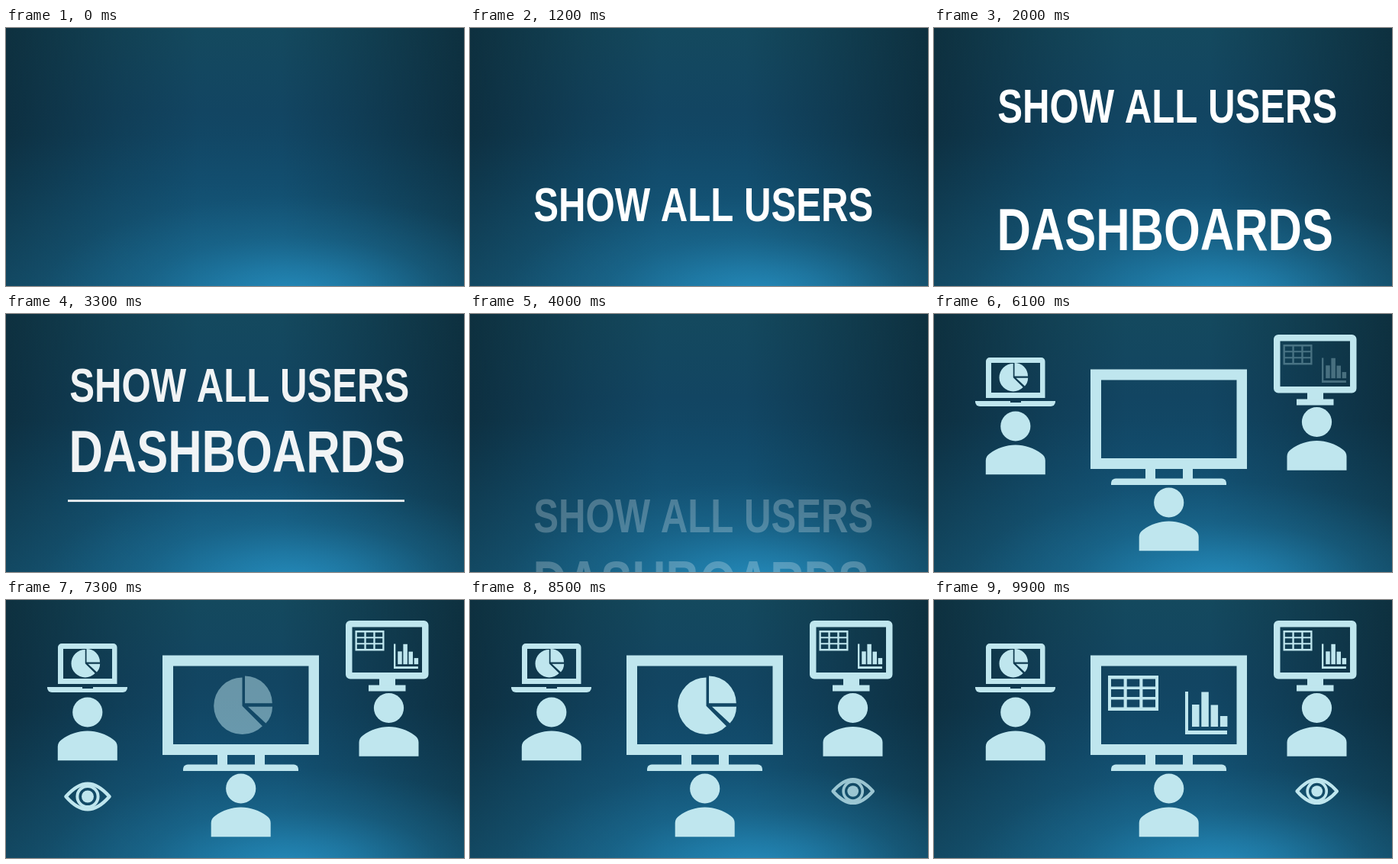
Recreate the animation shown at these times as an HTML page with a canvas. Size 600 by 338 pixels, loop 10 s.

```html
<!DOCTYPE html>
<html lang="en">
<head>
<meta charset="utf-8">
<title>Show all users dashboards</title>
<style>
html, body { margin: 0; width: 100%; height: 100%; overflow: hidden; background: #124a68; }
canvas { display: block; width: 100vw; height: 100vh; }
</style>
</head>
<body>
<canvas id="stage" width="600" height="338"></canvas>
<script>
const W = 600, H = 338, LOOP = 10000, STEP = 100;
const ICON = '#bfe6ee', NARROW = 0.788, RAD = Math.PI / 180;

const out = document.getElementById('stage').getContext('2d');
const makeLayer = () => {
  const c = document.createElement('canvas');
  c.width = W;
  c.height = H;
  return c.getContext('2d');
};
const back = makeLayer();
const g = makeLayer();

const clamp = v => Math.max(0, Math.min(1, v));
const ramp = (t, start, dur) => clamp((t - start) / dur);

// ---------- background ----------
function shade(gradient, stops) {
  for (const [at, color] of stops) gradient.addColorStop(at, color);
  back.fillStyle = gradient;
}

function paintBack() {
  shade(back.createLinearGradient(0, 0, 0, H),
    [[0, '#14495e'], [0.32, '#124562'], [0.6, '#114a6a'], [1, '#15597b']]);
  back.fillRect(0, 0, W, H);
  const dark = a => `rgba(11,38,50,${a})`;
  shade(back.createLinearGradient(0, 0, W, 0),
    [[0, dark(0.7)], [0.12, dark(0.48)], [0.25, dark(0.24)], [0.42, dark(0)],
     [0.6, dark(0)], [0.75, dark(0.24)], [0.88, dark(0.48)], [1, dark(0.7)]]);
  back.fillRect(0, 0, W, H);
  shade(back.createLinearGradient(0, 140, 0, H),
    [[0, 'rgba(28,113,154,0)'], [1, 'rgba(28,113,154,.32)']]);
  back.fillRect(0, 140, W, H - 140);
  back.save();
  back.translate(375, 352);
  back.scale(1, 0.4);
  shade(back.createRadialGradient(0, 0, 0, 0, 0, 330),
    [[0, 'rgba(38,144,194,.9)'], [0.3, 'rgba(36,138,186,.58)'],
     [0.6, 'rgba(32,126,170,.24)'], [1, 'rgba(28,113,154,0)']]);
  back.fillRect(-400, -400, 800, 800);
  back.restore();
}

// ---------- helpers ----------
function layer(alpha, dy, draw) {
  if (alpha <= 0) return;
  g.clearRect(0, 0, W, H);
  g.save();
  g.translate(0, dy);
  g.fillStyle = g.strokeStyle = ICON;
  draw();
  g.restore();
  out.globalAlpha = alpha;
  out.drawImage(g.canvas, 0, 0);
  out.globalAlpha = 1;
}

function at(x, y, s, draw) {
  g.save();
  g.translate(x, y);
  g.scale(s, s);
  draw();
  g.restore();
}

// boxes are given by their edges
const box = (l, t, r, b) => g.fillRect(l, t, r - l, b - t);

function rounded(l, t, r, b, radii) {
  g.beginPath();
  g.roundRect(l, t, r - l, b - t, radii);
  g.fill();
}

function frame(l, t, r, b, radii, il, it, ir, ib) {
  g.beginPath();
  g.roundRect(l, t, r - l, b - t, radii);
  g.rect(il, it, ir - il, ib - it);
  g.fill('evenodd');
}

function disc(x, y, r) {
  g.beginPath();
  g.arc(x, y, r, 0, 2 * Math.PI);
  g.fill();
}

function words(text, x, y, size) {
  g.save();
  g.translate(x, y);
  g.scale(NARROW, 1);
  g.font = `bold ${size}px "Liberation Sans", Arial, sans-serif`;
  g.fontKerning = 'none';
  g.fillText(text, 0, 0);
  g.restore();
}

// ---------- icons ----------
function person(x, y) {
  at(x, y, 1, () => {
    disc(0, 0, 19.6);
    g.beginPath();
    g.moveTo(-39, 63.3);
    g.lineTo(-39, 45);
    g.bezierCurveTo(-39, 41, -37, 38, -34, 36);
    g.bezierCurveTo(-24, 28.5, -12, 24.6, 0, 24.6);
    g.bezierCurveTo(12, 24.6, 24, 28.5, 34, 36);
    g.bezierCurveTo(37, 38, 39, 41, 39, 45);
    g.lineTo(39, 63.3);
    g.fill();
  });
}

function laptop() {
  frame(68, 57, 145.5, 110, [5, 5, 0, 0], 75, 64, 139, 103);
  rounded(54, 114, 159, 121, [0, 0, 6, 6]);
  g.clearRect(100, 113, 13.5, 3.2);
}

function bigScreen() {
  frame(205, 72.5, 410, 203, 0, 219, 86.5, 396.5, 189);
  box(277, 202, 290, 217);
  box(326, 202, 339, 217);
  rounded(232, 215.5, 383, 224, [6, 6, 0, 0]);
}

function monitor() {
  frame(445, 27, 553.5, 103.5, 6, 453.5, 35.5, 545, 95);
  box(489, 103, 510, 113);
  box(475, 111.5, 523.5, 119.5);
}

function sector(x, y, r, from, to) {
  g.beginPath();
  g.moveTo(x, y);
  g.arc(x, y, r, from * RAD, to * RAD);
  g.fill();
}

function pie() {
  sector(-1.5, 0, 37.3, 45, 270);
  sector(2, -3.5, 35.8, 270, 360);
  sector(6, 1, 32, 0, 43);
}

function table() {
  g.beginPath();
  g.rect(0, 0, 66, 46);
  for (let i = 0; i < 9; i++) {
    g.rect(4 + (i % 3) * 20.7, 4.5 + Math.floor(i / 3) * 13.5, 16.6, 10);
  }
  g.fill('evenodd');
}

function bars() {
  box(0, 0, 4, 56);
  box(0, 51, 55, 56);
  [17, 0.5, 17.5, 32].forEach((top, i) => {
    const x = 9 + i * 12.3;
    box(x, top, x + 9.5, 46);
  });
}

function eye() {
  g.lineWidth = 4.6;
  g.lineJoin = 'round';
  g.beginPath();
  g.moveTo(-28.5, 0);
  g.bezierCurveTo(-18, -12, -9, -16.8, 0, -16.8);
  g.bezierCurveTo(9, -16.8, 18, -12, 28.5, 0);
  g.bezierCurveTo(18, 12, 9, 16.8, 0, 16.8);
  g.bezierCurveTo(-9, 16.8, -18, 12, -28.5, 0);
  g.closePath();
  g.stroke();
  g.lineWidth = 4;
  g.beginPath();
  g.arc(0, 0, 13.6, 0, 2 * Math.PI);
  g.stroke();
  disc(0, 0, 8);
}

// ---------- scenes ----------
const flyIn = (t, start, dur, from) => from * (1 - ramp(t, start, dur));

// a short lift, then an accelerating drop
function sink(t) {
  if (t < 3320) {
    const u = 1 - ramp(t, 3240, 80);
    return -10 * (1 - u * u);
  }
  return -10 + 172 * Math.pow((t - 3320) / 680, 2.35);
}

// decelerating climb past the resting place, then settle
function rise(u) {
  if (u < 0.9) return 321 * Math.pow(1 - u / 0.9, 2) - 10;
  return -10 * (1 - Math.pow((u - 0.9) / 0.1, 2));
}

function titles(t) {
  if (t < 840 || t > 4190) return;
  layer(1 - ramp(t, 3240, 1000), sink(t), () => {
    g.fillStyle = '#fff';
    words('SHOW ALL USERS', 83.2, 124 + flyIn(t, 840, 700, 266), 62.4);
    if (t > 1540) words('DASHBOARDS', 82.4, 216.3 + flyIn(t, 1540, 760, 188), 78);
    const y = 252.7 + flyIn(t, 2300, 760, 87);
    if (t > 2300) box(81, y, 522, y + 2.8);
  });
}

function users(t) {
  const u = ramp(t, 4930, 500);
  layer(u, rise(u), () => {
    laptop();
    bigScreen();
    monitor();
    person(106.8, 147);
    person(307.7, 247);
    person(501.5, 141.5);
  });
  layer(ramp(t, 5430, 500), 0, () => at(104.5, 83.2, 0.49, pie));
  layer(ramp(t, 5940, 500), 0, () => {
    at(457.5, 40, 0.576, table);
    at(508, 57.5, 0.58, bars);
  });
  layer(ramp(t, 6450, 500) - ramp(t, 7640, 480), 0, () => at(107, 257.5, 1, eye));
  layer(ramp(t, 7050, 500) - ramp(t, 8600, 480), 0, () => at(311, 138.8, 1, pie));
  layer(ramp(t, 8120, 480), 0, () => at(501.7, 250.5, 0.92, eye));
  layer(ramp(t, 9070, 480), 0, () => {
    at(228, 99, 1, table);
    at(329, 120, 1, bars);
  });
}

function render(now) {
  const t = Math.floor((now % LOOP) / STEP) * STEP;
  out.drawImage(back.canvas, 0, 0);
  titles(t);
  users(t);
}

function tick() {
  render(performance.now());
  requestAnimationFrame(tick);
}

paintBack();
tick();
</script>
</body>
</html>
```
